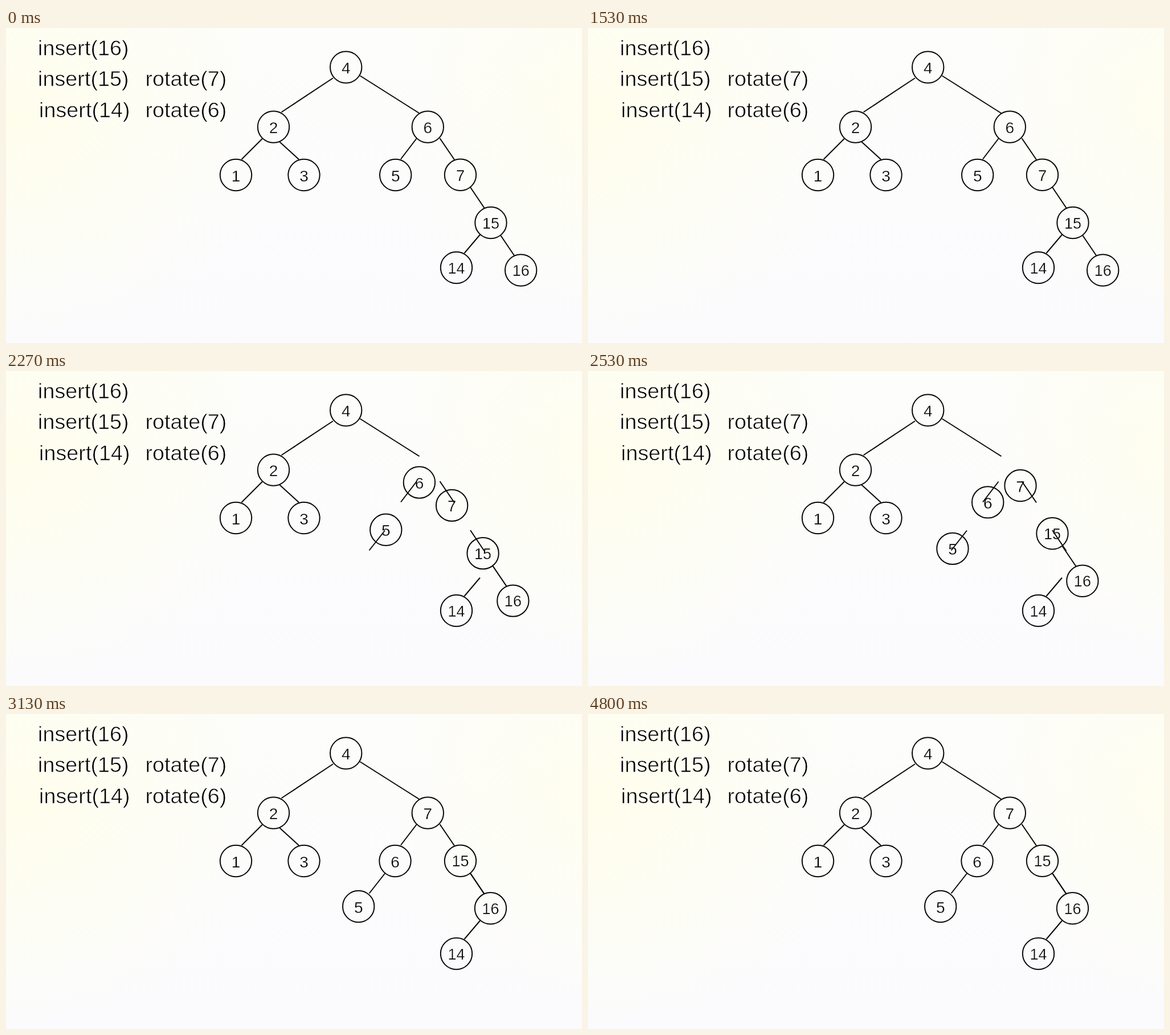
An HTML page for the animation above (4.87 s loop, 1011 by 554 pixels).

```html
<!DOCTYPE html>
<html lang="en">
<head>
<meta charset="utf-8">
<title>Tree rotation</title>
<style>
  html, body { margin: 0; width: 100%; height: 100%; overflow: hidden; }
  body {
    background:
      radial-gradient(ellipse 48% 75% at 0% 28%, #fffeec, #fffeec00),
      radial-gradient(ellipse 34% 70% at 100% 25%, #fffef0, #fffef000),
      linear-gradient(#fdfdfb, #fcfcfd 55%, #fbfbfe);
  }
  svg { display: block; width: 100%; height: 100%; }
  /* a pale outline thins the letters to a light weight */
  text {
    font-family: "Liberation Sans", Arial, sans-serif;
    fill: #000; stroke: #fdfdfa; stroke-width: .75;
  }
  .log { font-size: 37.8px; }
  .node text { font-size: 28px; text-anchor: middle; stroke-width: .4; }
  .node .wide { font-size: 27px; }
  circle, line { fill: none; stroke: #080808; stroke-width: 2; }
</style>
</head>
<body>
<svg id="stage" viewBox="0 0 1011 554"></svg>
<script>
const LOOP = 4870, STEP = 200 / 3, START = 1933, MOVE = 980;
const stage = document.getElementById("stage");

function add(parent, tag, attrs, text) {
  const el = document.createElementNS("http://www.w3.org/2000/svg", tag);
  for (const key in attrs) el.setAttribute(key, attrs[key]);
  if (text !== undefined) el.textContent = text;
  parent.appendChild(el);
  return el;
}

const log = [
  ["insert(16)", 56, 47.5],
  ["insert(15)", 56, 102],
  ["rotate(7)", 244.5, 102],
  ["insert(14)", 58, 156.5],
  ["rotate(6)", 244.5, 156.5]
];
for (const [text, x, y] of log) add(stage, "text", { class: "log", x, y }, text);

// label, x, y, and the end point for nodes that move
const nodes = [
  [4, 596.7, 69],
  [2, 469.5, 174],
  [1, 403.5, 258.5],
  [3, 523, 258.5],
  [14, 790.5, 421.5],
  [6, 740.3, 174, 683, 258.5],
  [5, 683.7, 258.5, 618.7, 338.5],
  [7, 797.5, 258.3, 740.3, 174],
  [15, 851, 342.5, 797.5, 258.3],
  [16, 903.7, 426, 850.5, 341.8]
].map(([label, x, y, toX = x, toY = y]) => {
  const el = add(stage, "g", { class: "node" });
  add(el, "circle", { r: 27.7 });
  add(el, "text", { y: label > 9 ? 10 : 11, class: label > 9 ? "wide" : "" }, label);
  return { el, x, y, toX, toY };
});

function edge(x1, y1, x2, y2) {
  return add(stage, "line", { x1, y1, x2, y2 });
}
edge(574, 88, 483.5, 148);
edge(621.5, 84, 725.5, 150);
edge(450, 194.5, 413.5, 231);
edge(480, 200, 514, 231);
edge(720.5, 194.5, 693, 230.5);
edge(761.5, 194, 787, 231.5);
edge(815, 280, 839.5, 316.5);
edge(832, 363.5, 804.5, 396);
const newEdge = edge(665, 280.5, 637.5, 315.5);
const slidingEdge = edge(868, 364.5, 892, 400);

function place(el, x, y) {
  el.setAttribute("transform", `translate(${x} ${y})`);
}

function draw(ms) {
  const time = Math.floor((ms % LOOP + 3.4) / STEP) * STEP;
  const p = Math.min(1, Math.max(0, (time - START) / MOVE));
  const ease = (1 - Math.cos(Math.PI * p)) / 2;
  for (const n of nodes) {
    place(n.el, n.x + (n.toX - n.x) * ease, n.y + (n.toY - n.y) * ease);
  }
  place(slidingEdge, -53 * ease, -84.3 * ease);
  newEdge.style.display = time >= START ? "" : "none";
}

const begin = performance.now();
function tick() {
  draw(performance.now() - begin);
  requestAnimationFrame(tick);
}
tick();
</script>
</body>
</html>
```
